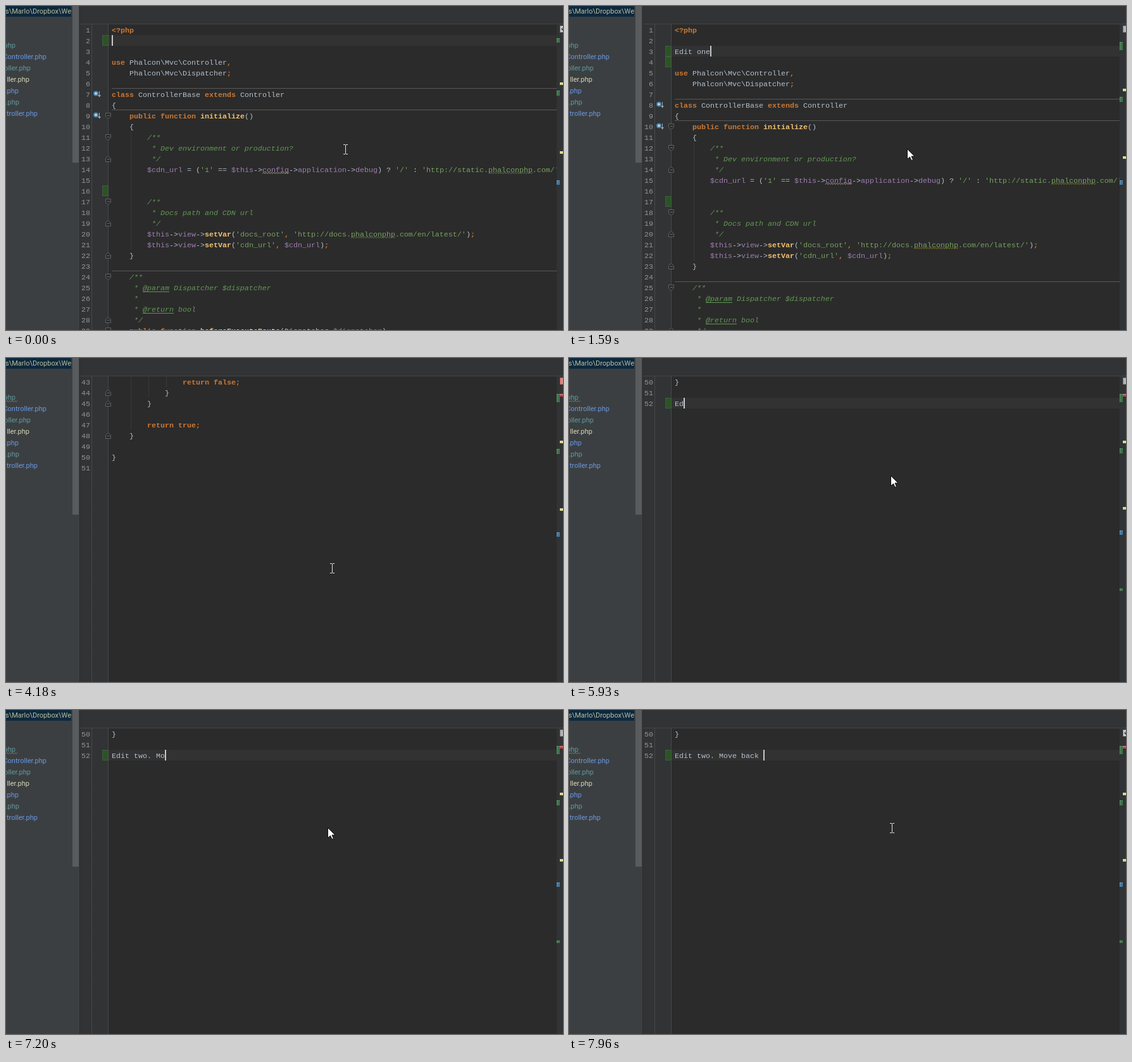
Recreate the animation shown at these times as an HTML page with a canvas. Size 880 by 513 pixels, loop 8 s.

```html
<!DOCTYPE html>
<html lang="en">
<head>
<meta charset="utf-8">
<title>Editor</title>
<style>
  html, body { margin: 0; width: 100%; height: 100%; overflow: hidden; background: #2b2b2b; }
  canvas { display: block; }
</style>
</head>
<body>
<canvas id="stage" width="880" height="513"></canvas>
<script>
const ctx = document.getElementById('stage').getContext('2d');
const LOOP = 8000, ROW = 17, CHAR = 7, LEFT = 167, EDGE = 870;
const MONO = '11.666px "Liberation Mono", monospace';
const SANS = '11px Roboto, sans-serif';
const COLORS = {
  text: '#b2bfcd', keyword: '#cc7832', doc: '#629755', variable: '#9d7cb0',
  string: '#76a060', method: '#f4c06c'
};
const KEYWORDS = /^(<\?php|use|class|extends|public|function|return|if|true|false)$/;

const CODE = String.raw`<?php


use Phalcon\Mvc\Controller,
    Phalcon\Mvc\Dispatcher;

class ControllerBase extends Controller
{
    public function initialize()
    {
        /**
         * Dev environment or production?
         */
        $cdn_url = ('1' == $this->config->application->debug) ? '/' : 'http://static.phalconphp.com/';


        /**
         * Docs path and CDN url
         */
        $this->view->setVar('docs_root', 'http://docs.phalconphp.com/en/latest/');
        $this->view->setVar('cdn_url', $cdn_url);
    }

    /**
     * @param Dispatcher $dispatcher
     *
     * @return bool
     */
    public function beforeExecuteRoute(Dispatcher $dispatcher)
    {
        $name = $dispatcher->getControllerName();
        $action = $dispatcher->getActionName();

        if ($name == 'admin') {

            $auth = $this->session->get('auth');

            if (!$auth) {

                $this->flash->error($action);

                return false;
            }
        }

        return true;
    }

}
`.split('\n');

const FILES = [
  ['php', 15, '#5f9a9c'], ['Controller.php', 64, '#6899e2'], ['oller.php', 39, '#5f9a9c'],
  ['ller.php', 37, '#d6d6b4'], ['.php', 20, '#6899e2'], ['.php', 21, '#5f9a9c'],
  ['troller.php', 50, '#6899e2']
];

const FIRST = { text: 'Edit one', keys: [730, 910, 1000, 1100, 1210, 1330, 1450, 1560] };
const SECOND = {
  text: 'Edit two. Move back ',
  keys: [5690, 5800, 5990, 6070, 6160, 6380, 6630, 6720, 6820, 6930,
         7040, 7150, 7270, 7370, 7490, 7580, 7670, 7760, 7860, 7960]
};
const POINTER = [[0, 536, 227], [2070, 536, 227], [2140, 540, 199], [2790, 540, 199],
  [3080, 532, 230], [3380, 532, 230], [3700, 515, 333], [4700, 515, 333], [4960, 510, 187]];

const between = (t, a, b) => t >= a && t < b;
const typed = ({ text, keys }, t) => text.slice(0, keys.filter(k => k <= t).length);

function rect(color, x, y, w, h) {
  ctx.fillStyle = color;
  ctx.fillRect(x, y, w, h);
}

function label(str, x, y, color, font = MONO, align = 'left') {
  ctx.font = font;
  ctx.textAlign = align;
  ctx.fillStyle = color;
  ctx.fillText(str, x, y);
}

function path(points, stroke, fill, close = true) {
  ctx.beginPath();
  points.forEach(([x, y]) => ctx.lineTo(x, y));
  if (close) ctx.closePath();
  if (fill) { ctx.fillStyle = fill; ctx.fill(); }
  if (stroke) { ctx.strokeStyle = stroke; ctx.lineWidth = 1; ctx.stroke(); }
}

function dotted(x, y, length, vertical) {
  for (let i = 0; i < length; i += 2)
    vertical ? rect('#5a5c5e', x, y + i, 1, 1) : rect('#5a5c5e', x + i, y, 1, 1);
}

function squiggle(x, y, width, color) {
  const points = [];
  for (let i = 0; i <= width; i += 2) points.push([x + i, y + (i % 4 ? 0 : 2)]);
  path(points, color, null, false);
}

function sidebar(t) {
  rect('#3c3f41', 0, 0, 116, 513);
  rect('#0d293e', 0, 0, 103, 17);
  label('s\\Marlo\\Dropbox\\We', 103, 12, '#bfbd9c', SANS, 'right');
  FILES.forEach(([name, end, color], i) => label(name, end, 66 + 18 * i, color, SANS, 'right'));
  if (t >= 3230) squiggle(0, 67.5, 18, '#71847f');
  rect('#595b5d', 105, 0, 10, 248);
  rect('#2b2b2b', 116, 0, 1, 513);
}

function foldMark(y, up) {
  const s = up ? -1 : 1;
  path([[157.5, y - 4.5 * s], [165.5, y - 4.5 * s], [165.5, y + s], [161.5, y + 4.5 * s], [157.5, y + s]],
    '#5f6163', '#2b2b2b');
  rect('#6c6e70', 160, y - (up ? 0 : 1), 4, 1);
}

function overrideMark(y) {
  ctx.beginPath();
  ctx.arc(142, y - 1.5, 3, 0, 7);
  ctx.fillStyle = '#c4d6e0';
  ctx.fill();
  ctx.strokeStyle = '#4585ad';
  ctx.lineWidth = 2;
  ctx.stroke();
  rect('#a3a8ad', 147, y - 5, 1, 9);
  path([[145, y + 1], [150, y + 1], [147.5, y + 4.5]], null, '#a3a8ad');
}

function codeText(line, y) {
  const indent = line.search(/\S/);
  if (/^\s*(\/\*\*|\*)/.test(line)) {
    label(line, LEFT, y + 4, COLORS.doc, 'italic ' + MONO);
    const tag = line.match(/@\w+/);
    if (tag) rect(COLORS.doc, LEFT + tag.index * CHAR, y + 6, tag[0].length * CHAR, 1);
    return;
  }
  const tokens = line.trim().match(/'[^']*'|->|\$\w+|<\?php|\w+|\s+|./g) || [];
  let x = LEFT + Math.max(0, indent) * CHAR, previous = '';
  tokens.forEach((token, i) => {
    let kind = 'text';
    if (token[0] === "'") kind = 'string';
    else if (token[0] === '$') kind = 'variable';
    else if (KEYWORDS.test(token) || /^[;,]$/.test(token)) kind = 'keyword';
    else if (previous === 'function') kind = 'method';
    else if (previous === '->') kind = tokens[i + 1] === '(' ? 'method' : 'variable';
    const bold = kind === 'method' || kind === 'keyword';
    label(token, x, y + 4, COLORS[kind], (bold ? 'bold ' : '') + MONO);
    x += token.length * CHAR;
    if (token.trim()) previous = token;
  });
}

// Blank lines take the smaller indent of their nearest neighbours.
function guideDepth(lines, i) {
  const depth = step => {
    let k = i;
    while (lines[k] === '') k += step;
    return Math.floor((lines[k] || '').search(/\S|$/) / 4) * 4;
  };
  return Math.min(depth(-1), depth(1));
}

function codeRow(lines, i, y, changed, t) {
  const line = lines[i];
  label(i + 1, 133, y + 4, '#939597', MONO, 'right');
  if (changed.includes(i + 1)) {
    rect('#46584a', 152, y - 9, 10, ROW);
    rect('#2b5423', 153, y - 8, 8, ROW - 2);
  }
  if (/^class|initialize/.test(line)) overrideMark(y);
  if (/function|\/\*\*|if \(/.test(line)) foldMark(y, false);
  if (/\*\/|^\s+}/.test(line)) foldMark(y, true);

  ctx.save();
  ctx.beginPath();
  ctx.rect(162, 29, EDGE - 162, 484);
  ctx.clip();
  for (let col = 4; col < guideDepth(lines, i); col += 4)
    rect('#393939', LEFT + col * CHAR + 2, y - 9, 1, ROW);
  if (/^class|initialize|^ {4}\/\*\*/.test(line)) rect('#585858', LEFT, y - 10, EDGE - LEFT, 1);
  codeText(line, y);
  for (const word of ['config', 'phalconphp']) {
    const at = line.indexOf(word);
    const color = word === 'config' ? '#a9a68a' : t < 910 ? '#5d7d50' : '#878022';
    if (at >= 0) squiggle(LEFT + at * CHAR, y + 4.5, word.length * CHAR, color);
  }
  ctx.restore();
}

function firstLine(t) {
  if (t < 3380) return 0;
  if (t < 4230) return Math.min(42, 3 + 3 * Math.floor((t - 3380) / 61.5));
  return Math.min(49, 43 + Math.floor((t - 4230) / 48));
}

function editor(t) {
  const lines = CODE.slice();
  const entered = t >= 120, appended = t >= 5010;
  if (entered) lines.splice(2, 0, typed(FIRST, t));
  if (appended) lines.push(typed(SECOND, t));

  const top = firstLine(t);
  const rowY = i => 38 + (i - top) * ROW;
  const caretLine = appended ? 51 : t >= 4720 ? 50 : entered ? 2 : 1;
  const changed = entered ? [3, 4, 17] : [2, 16];
  if (t >= 5690) changed.push(52);

  rect('#2b2b2b', 162, 29, 708, 484);
  rect('#313335', 117, 29, 45, 484);
  if (caretLine >= top) rect('#323232', 162, rowY(caretLine) - 9, EDGE - 162, ROW);
  dotted(135, 29, 484, true);
  dotted(161, 29, 484, true);
  for (let i = top; i < lines.length && i < top + 29; i++) codeRow(lines, i, rowY(i), changed, t);
  if (caretLine >= top && !between(t, 2290, 2740))
    rect('#c8c8c8', LEFT + lines[caretLine].length * CHAR, rowY(caretLine) - 9, 2, ROW);

  rect('#313335', 117, 0, 763, 28);
  dotted(117, 28, 763, false);
}

function statusBox(t) {
  const busy = t < 450 || between(t, 730, 910) || between(t, 2830, 3000) ||
    between(t, 4720, 5290) || t >= 7960;
  const failed = between(t, 3000, 4720);
  rect(failed ? '#b06a6a' : '#858585', 875, 31, 5, 11);
  rect(busy ? '#d0d0d0' : failed ? '#e08585' : '#b4b4b4', 876, 32, 4, 9);
  if (busy) {
    path([[880, 33.5], [877.5, 36.5], [880, 39.5]], '#444', null, false);
    rect('#444', 878, 36, 2, 2);
  }
}

function stripe(t) {
  rect('#313335', EDGE, 29, 10, 484);
  const change = (y, h, color = '#3a7549') => {
    rect(color, EDGE, y, 5, h);
    rect('#ffffff30', EDGE, y, 5, 1);
    rect('#ffffff30', EDGE, y, 1, h);
  };
  const warning = (y, color = '#d9d68c') => {
    rect(color, 875, y, 5, 4);
    rect('#ffffff70', 875, y, 5, 1);
  };
  const shifted = t >= 450, longer = t >= 5010;
  change(shifted ? 57 : 51, shifted ? 13 : 7);
  warning(shifted ? 131 : 121);
  change(longer ? 143 : shifted ? 144 : 134, 8);
  warning(longer ? 236 : shifted ? 238 : 230);
  change(longer ? 273 : 276, 7, '#3f78a6');
  if (t >= 3000) warning(57, '#cf3f3f');
  if (longer) change(365, 4);
  statusBox(t);
}

function pointerAt(t) {
  const next = POINTER.findIndex(p => p[0] > t);
  if (next < 0) return POINTER[POINTER.length - 1].slice(1);
  const [t0, x0, y0] = POINTER[next - 1], [t1, x1, y1] = POINTER[next];
  const k = (t - t0) / (t1 - t0);
  return [Math.round(x0 + (x1 - x0) * k), Math.round(y0 + (y1 - y0) * k)];
}

function pointer(t) {
  const [x, y] = pointerAt(t);
  if (between(t, 910, 1750) || between(t, 5690, 7960)) {
    const shape = [[0, 0], [0, 16], [4, 12.5], [6.5, 18], [9, 17], [6.5, 11.5], [11.5, 11.5]];
    path(shape.map(([dx, dy]) => [x - 1.5 + dx, y - 0.5 + dy]), '#111', '#fff');
  } else {
    rect('#e4e4e4', x, y - 7, 1, 14);
    for (const edge of [y - 8, y + 7]) {
      rect('#e4e4e4', x - 3, edge, 3, 1);
      rect('#e4e4e4', x + 1, edge, 3, 1);
    }
  }
}

function draw(now) {
  const t = now % LOOP;
  editor(t);
  sidebar(t);
  stripe(t);
  pointer(t);
  requestAnimationFrame(draw);
}
requestAnimationFrame(draw);
</script>
</body>
</html>
```
